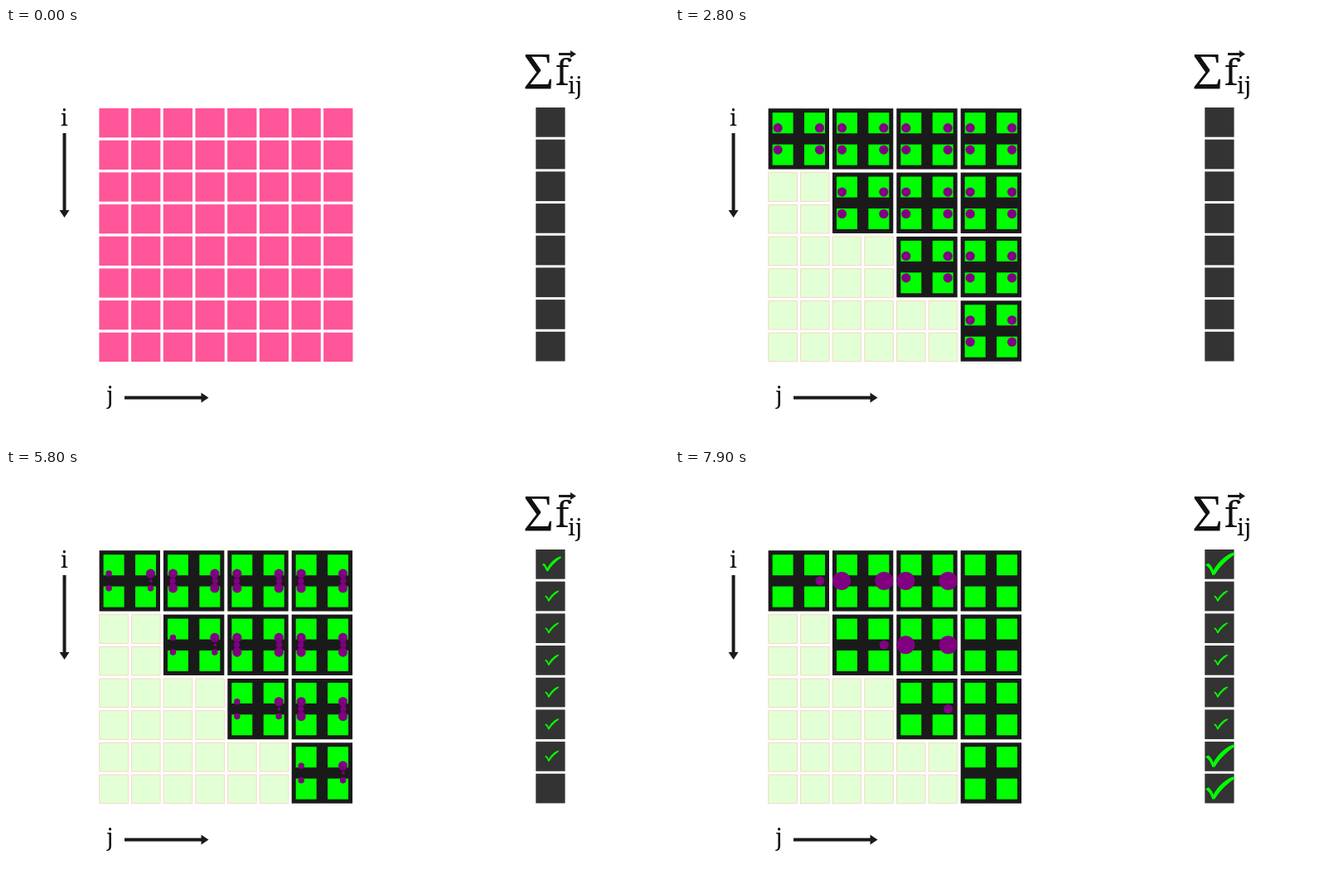
Animation, 800 px wide and 500 px high, one loop 8 s. Source, as an HTML page with a canvas:

```html
<!DOCTYPE html>
<html>
<head>
<meta charset="utf-8">
<title>Pairwise force sum</title>
<style>
html, body { margin: 0; width: 800px; height: 500px; overflow: hidden; background: #fff; }
canvas { display: block; }
</style>
</head>
<body>
<canvas id="stage" width="800" height="500"></canvas>
<script>
const ctx = document.getElementById('stage').getContext('2d');
const LOOP = 8000, TICK = 100;
const INK = '#1a1a1a', PINK = '#ff5599', GREEN = '#00ff00', PURPLE = '#800080';
const PITCH = 38.68, CELL = 35.3, TILE = 2 * PITCH;
const SMALL = 5.6, BIG = 11;
const checkShape = new Path2D('M-17.5 1L-14-1C-11 1-9 4-8 8C-2-3 8-12 17-14L18-11.5' +
  'C8-5 0 3-6 13L-9 13.5C-11 8-13 4-17.5 1Z');

// Progress of the last column's dots after one tick, by tile row
const startX = [.068, .152, .204, .356], startY = [.107, .149, .227, .6];

const lerp = (a, b, p) => a + (b - a) * p;
const midX = c => 149.3 + TILE * c;
const midY = r => 133.9 + TILE * r;

function rect(x, y, w, h, color) {
  ctx.fillStyle = color;
  ctx.fillRect(x, y, w, h);
}

function dot(x, y, r) {
  if (r <= 0) return;
  ctx.fillStyle = PURPLE;
  ctx.beginPath();
  ctx.arc(x, y, r, 0, 2 * Math.PI);
  ctx.fill();
}

function text(str, x, y, font) {
  ctx.fillStyle = '#111';
  ctx.font = font;
  ctx.fillText(str, x, y);
}

function arrow(x, y, length, width, head, angle) {
  ctx.save();
  ctx.translate(x, y);
  ctx.rotate(angle);
  rect(0, -width / 2, length - head, width, INK);
  ctx.beginPath();
  ctx.moveTo(length - head - 1, -head * .75);
  ctx.lineTo(length, 0);
  ctx.lineTo(length - head - 1, head * .75);
  ctx.fill();
  ctx.restore();
}

function check(row, scale) {
  if (scale <= 0) return;
  ctx.save();
  ctx.translate(lerp(659.5, 657.5, scale), 113.5 + PITCH * row);
  ctx.scale(scale, scale);
  ctx.fillStyle = GREEN;
  ctx.fill(checkShape);
  ctx.restore();
}

function labels() {
  text('i', 66, 118, '27px "Noto Serif", serif');
  arrow(70.5, 127, 102, 4, 8, Math.PI / 2);
  text('j', 121.5, 453, '27px "Noto Serif", serif');
  arrow(143, 446.5, 101.5, 4, 8, 0);
  text('Σ', 624, 74, '64px "Liberation Serif", serif');
  text('f', 663, 69, '44px "Noto Serif", serif');
  text('ij', 678, 79, '28px "Noto Serif", serif');
  arrow(667, 31.5, 21, 3, 6, 0);
}

function darkTile(r, c) {
  rect(midX(c) - 36.7, midY(r) - 36.7, 73.4, 73.4, INK);
  for (const u of [-1, 1])
    for (const v of [-1, 1])
      rect(midX(c) + 19.2 * u - 12.5, midY(r) + 19.2 * v - 12.5, 25, 25, GREEN);
}

function quad(r, c, paint) {
  for (let k = 0; k < 4; k++)
    paint(112.4 + TILE * c + PITCH * (k % 2), 97 + TILE * r + PITCH * (k >> 1));
}

function eachTile(draw) {
  for (let r = 0; r < 4; r++) for (let c = 0; c < 4; c++) draw(r, c);
}

function grid(t) {
  const dark = ramp(t, 600, 3), pale = ramp(t, 1300, 3);
  eachTile((r, c) => {
    const fade = r > c ? pale : 0;
    if (dark < 1) quad(r, c, (x, y) => rect(x, y, CELL, CELL, PINK));
    ctx.globalAlpha = dark * (1 - fade);
    darkTile(r, c);
    ctx.globalAlpha = fade;
    quad(r, c, (x, y) => {
      rect(x, y, CELL, CELL, '#e3ffd5');
      ctx.strokeStyle = '#fbcfc6';
      ctx.lineWidth = .8;
      ctx.strokeRect(x + .3, y + .3, CELL - .6, CELL - .6);
    });
    ctx.globalAlpha = 1;
  });
}

// Ticks done since a start time, and the same as a 0..1 progress
const ticks = (t, start) => Math.max(0, Math.floor((t - start) / TICK) + 1);
const ramp = (t, start, count) => Math.min(1, ticks(t, start) / count);

function pairDots(t, x, y, diagonal) {
  const grow = ramp(t, 1900, 3), shift = ramp(t, 2700, 2), merge = ramp(t, 5800, 3);
  if (merge === 1) return;
  for (const u of [-1, 1])
    for (const v of [-1, 1]) {
      const lost = diagonal && !(u > 0 && v < 0);
      dot(x + u * lerp(19.2, 25.2, shift),
          y + v * lerp(lerp(19.2, 13.2, shift), 0, merge),
          SMALL * grow * (lost ? 1 - merge : 1));
    }
}

function rowSums(t, x, y, diagonal) {
  const size = ramp(t, 3500, 3) * (diagonal ? SMALL : BIG), n = ticks(t, 4400);
  for (const v of diagonal ? [-1] : [-1, 1]) {
    const px = x + n * (v < 0 ? 75.5 : 80.7);
    if (px < 650) dot(px, y + v * (diagonal ? 23 : 25), size);
  }
}

function columnSums(t, r, c) {
  const size = ramp(t, 5800, 3) * (r === c ? SMALL : BIG);
  for (const u of r === c ? [1] : [-1, 1]) {
    const x = midX(c) + 25.6 * u, y = midY(r);
    let p = 0, q = 0, row = 7;
    if (c === 3 && u > 0) {
      const n = ticks(t, 6800) ** 1.25;
      p = Math.min(1, startX[r] * n);
      q = Math.min(1, startY[r] * n);
    } else if (c === 3) {
      p = q = ramp(t, 7700, 3);
      row = 6;
    }
    if (p < 1) dot(lerp(x, 657, p), lerp(y, 114 + PITCH * row, q), size);
  }
}

function checks(t) {
  const n = ticks(t, 4400);
  const small = n < 2 ? 0 : .06 * Math.min(n, 8);
  for (let row = 0; row < 7; row++) {
    const full = row === 0 ? ramp(t, 5800, 3) : row === 6 ? ramp(t, 7700, 3) : 0;
    check(row, lerp(small, 1, full));
  }
  check(7, Math.max(0, Math.min(1, (ticks(t, 6800) - 2) / 7)));
}

function draw(t) {
  rect(0, 0, 800, 500, '#fff');
  labels();
  grid(t);
  eachTile((r, c) => {
    if (r > c) return;
    pairDots(t, midX(c), midY(r), r === c);
    rowSums(t, midX(c), midY(r), r === c);
    columnSums(t, r, c);
  });
  for (let row = 0; row < 8; row++) rect(639.3, 96 + PITCH * row, CELL, CELL + .4, '#333');
  checks(t);
}

const begin = performance.now();
function frame() {
  draw((performance.now() - begin) % LOOP);
  requestAnimationFrame(frame);
}
frame();
</script>
</body>
</html>
```
